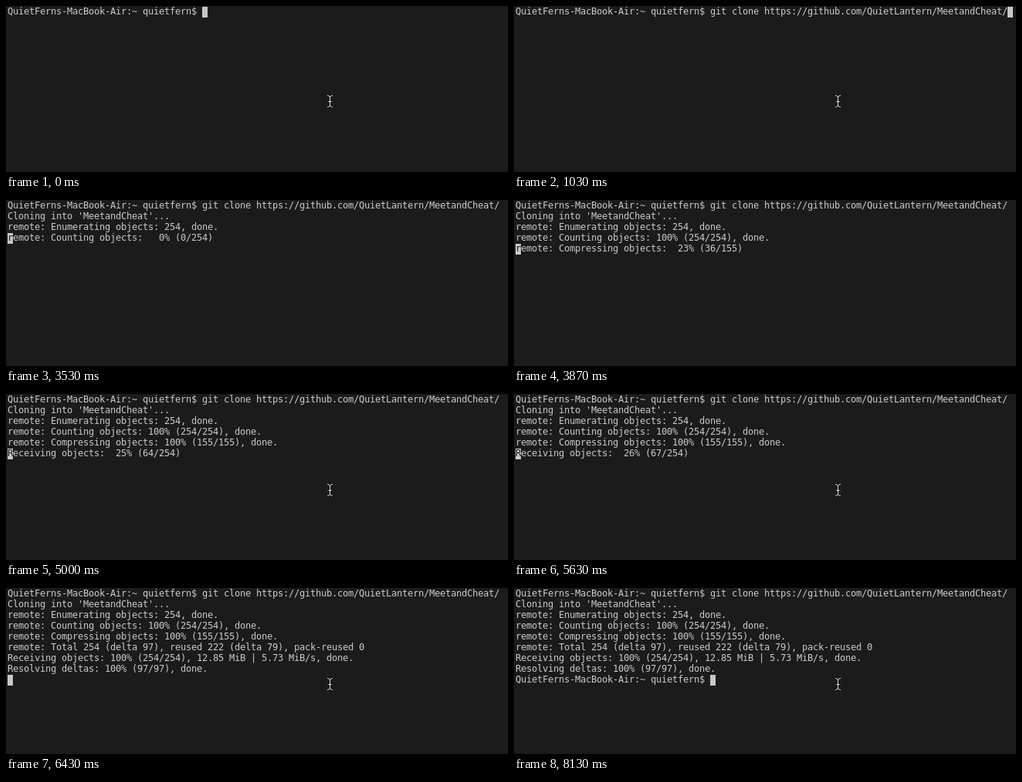
Recreate the animation shown at these times as an HTML page with a canvas. Size 650 by 216 pixels, loop 8210 ms.

```html
<!DOCTYPE html>
<html lang="en">
<head>
<meta charset="utf-8">
<title>git clone in a terminal</title>
<style>
  html, body { margin: 0; width: 100%; height: 100%; overflow: hidden; background: #1b1b1b; }
  canvas { display: block; }
</style>
</head>
<body>
<canvas id="stage" width="650" height="216"></canvas>
<script>
const ctx = document.getElementById('stage').getContext('2d');

const LOOP = 8210;
const CELL_W = 7, CELL_H = 14, LEFT = 2, TOP = 1, BASELINE = 10;
const BACK = '#1b1b1b', INK = '#cbcbcb', BLOCK = '#c7c7c7';

const PROMPT = 'QuietFerns-MacBook-Air:~ quietfern$ ';
const COMMAND = 'git clone https://github.com/QuietLantern/MeetandCheat/';
const OBJECTS = 254, PACKED = 155, DELTAS = 97;

const ramp = (t, t0, t1, from, to) =>
  Math.floor(from + (to - from) * Math.min(1, Math.max(0, (t - t0) / (t1 - t0))));

function progress(label, percent, total) {
  const done = Math.ceil(percent * total / 100);
  return `${label}: ${String(percent).padStart(3)}% (${done}/${total})`;
}

const counting = p => progress('remote: Counting objects', p, OBJECTS);
const compressing = p => progress('remote: Compressing objects', p, PACKED);
const receiving = p => progress('Receiving objects', p, OBJECTS);
const resolving = p => progress('Resolving deltas', p, DELTAS);

function receivingNow(t) {
  if (t < 5630) return receiving(ramp(t, 4130, 4270, 0, 25));
  if (t < 5970) return receiving(26);
  return receiving(ramp(t, 5970, 6330, 27, 35)) + ', 10.08 MiB | 5.01 MiB/s';
}

// Terminal contents at time t: text lines and the block cursor's cell.
function terminal(t) {
  const lines = [PROMPT + (t >= 200 ? COMMAND : '')];
  const at = (row, col = 0) => ({ lines, row, col });

  if (t < 2300) return at(0, lines[0].length);
  if (t < 2330) return at(1);
  lines.push("Cloning into 'MeetandCheat'...");
  if (t < 3530) return at(2);

  lines.push('remote: Enumerating objects: 254, done.');
  if (t < 3700) {
    lines.push(counting(ramp(t, 3530, 3690, 0, 100)));
    return at(3);
  }
  lines.push(counting(100) + ', done.');
  if (t < 4130) {
    lines.push(compressing(t < 4000 ? ramp(t, 3700, 3865, 0, 23) : ramp(t, 4000, 4120, 30, 100)));
    return at(4);
  }
  lines.push(compressing(100) + ', done.');
  if (t < 6400) {
    lines.push(receivingNow(t));
    return at(5);
  }
  lines.push('remote: Total 254 (delta 97), reused 222 (delta 79), pack-reused 0',
             receiving(100) + ', 12.85 MiB | 5.73 MiB/s, done.');
  if (t < 6430) {
    lines.push(resolving(0));
    return at(7);
  }
  lines.push(resolving(100) + ', done.');
  if (t < 6600) return at(8);
  lines.push(PROMPT);
  return at(8, PROMPT.length);
}

function drawChar(char, row, col, color) {
  ctx.fillStyle = color;
  ctx.fillText(char, LEFT + col * CELL_W, TOP + row * CELL_H + BASELINE);
}

function drawTerminal({ lines, row, col }) {
  ctx.font = '12px "DejaVu Sans Mono", monospace';
  ctx.textBaseline = 'alphabetic';
  lines.forEach((line, r) => [...line].forEach((char, c) => drawChar(char, r, c, INK)));

  ctx.fillStyle = BLOCK;
  ctx.fillRect(LEFT + col * CELL_W, TOP + row * CELL_H, CELL_W, CELL_H);
  const covered = (lines[row] || '')[col];
  if (covered) drawChar(covered, row, col, BACK);
}

function drawPointer(x, y) {
  const beam = new Path2D();
  for (const side of [-1, 1]) {
    beam.moveTo(x + side * 3.5, y - 7.5);
    beam.quadraticCurveTo(x, y - 7.5, x, y - 5);
    beam.lineTo(x, y + 5);
    beam.quadraticCurveTo(x, y + 7.5, x + side * 3.5, y + 7.5);
  }
  beam.moveTo(x - 2, y + 0.5);
  beam.lineTo(x + 2, y + 0.5);
  for (const [color, width] of [['#000', 2.4], ['#f2f2f2', 1]]) {
    ctx.strokeStyle = color;
    ctx.lineWidth = width;
    ctx.stroke(beam);
  }
}

function frame() {
  const t = performance.now() % LOOP;
  ctx.fillStyle = BACK;
  ctx.fillRect(0, 0, 650, 216);
  drawTerminal(terminal(t));
  if (t < 2300) drawPointer(419.5, 124);
  else if (t >= 5000) drawPointer(419.5, 125);
  requestAnimationFrame(frame);
}
frame();
</script>
</body>
</html>
```
